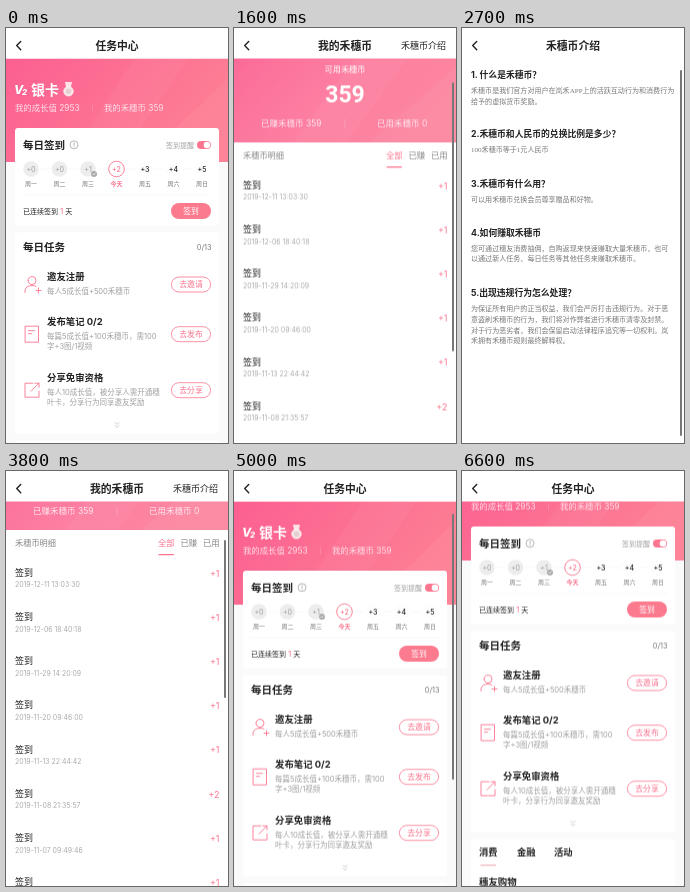
Animation of 222x415 px, one loop 6.8 s. Source, as an HTML page:

```html
<!DOCTYPE html>
<html lang="zh-CN">
<head>
<meta charset="utf-8">
<title>任务中心</title>
<style>
html, body { margin: 0; width: 100%; height: 100%; overflow: hidden; background: #fff; }
svg { display: block; width: 100vw; height: 100vh; }
text { font-family: Inter, "Noto Sans CJK SC", "Noto Sans CJK", sans-serif; white-space: pre; }
.serif { font-family: "Liberation Serif", serif; }
.number { font-family: Roboto, sans-serif; }

.anim { animation: 6.8s cubic-bezier(.22, .7, .2, 1) infinite; }
#home { animation-name: home; }
#coins { animation-name: coins; }
#intro { animation-name: intro; }
#homeTitle { animation-name: home-title; }
#coinsTitle { animation-name: coins-title; }
#introTitle { animation-name: intro-title; }
#homeScroll { animation-name: home-scroll; }
#homeBar { animation-name: home-bar; }
#coinsScroll { animation-name: coins-scroll; }
#coinsBar { animation-name: coins-bar; }
#returnBar { animation-name: return-bar; }

/* page pushes and pops */
@keyframes home {
  0%, 9.56% { transform: translateX(0); }
  19.12%, 58.09% { transform: translateX(-66px); }
  67.65%, 100% { transform: translateX(0); }
}
@keyframes coins {
  0%, 9.56% { transform: translateX(222px); }
  19.12%, 34.56% { transform: translateX(0); }
  39.71%, 47.79% { transform: translateX(-66px); }
  55.88%, 58.09% { transform: translateX(0); }
  67.65%, 100% { transform: translateX(222px); }
}
@keyframes intro {
  0%, 34.56% { transform: translateX(222px); }
  39.71%, 47.79% { transform: translateX(0); }
  55.88%, 100% { transform: translateX(222px); }
}
@keyframes home-title {
  0%, 9.56% { transform: translateX(0); opacity: 1; }
  19.12%, 58.09% { transform: translateX(-80px); opacity: 0; }
  67.65%, 100% { transform: translateX(0); opacity: 1; }
}
@keyframes coins-title {
  0%, 9.56% { transform: translateX(90px); opacity: 0; }
  19.12%, 34.56% { transform: translateX(0); opacity: 1; }
  39.71%, 47.79% { transform: translateX(-80px); opacity: 0; }
  55.88%, 58.09% { transform: translateX(0); opacity: 1; }
  67.65%, 100% { transform: translateX(90px); opacity: 0; }
}
@keyframes intro-title {
  0%, 34.56% { transform: translateX(90px); opacity: 0; }
  39.71%, 47.79% { transform: translateX(0); opacity: 1; }
  55.88%, 100% { transform: translateX(90px); opacity: 0; }
}

/* scrolling and its indicators */
@keyframes home-scroll {
  0%, 73.53% { transform: translateY(0); }
  79.41%, 100% { transform: translateY(-44.5px); }
}
@keyframes home-bar {
  0%, 72.8% { transform: translateY(0); opacity: 0; }
  73.5% { transform: translateY(0); opacity: 1; }
  79.41%, 85% { transform: translateY(31px); opacity: 1; }
  89.7%, 100% { transform: translateY(31px); opacity: 0; }
}
@keyframes coins-scroll {
  0%, 22.79% { transform: translateY(0); }
  23.53% { transform: translateY(-10px); }
  27.94%, 100% { transform: translateY(-66px); }
}
@keyframes coins-bar {
  0%, 22.79% { transform: translateY(0); opacity: 0; }
  23.53% { transform: translateY(7px); opacity: 1; }
  27.94%, 30.9% { transform: translateY(41px); opacity: 1; }
  33.8%, 100% { transform: translateY(41px); opacity: 0; }
}
@keyframes return-bar {
  0%, 50% { opacity: 0; }
  51%, 56.6% { opacity: 1; }
  57.3%, 100% { opacity: 0; }
}
</style>
</head>
<body>
<svg id="stage" viewBox="0 0 222 415" preserveAspectRatio="none">
  <defs>
    <linearGradient id="rose" x2="1" y2=".4">
      <stop stop-color="#fc5f91"/><stop offset="1" stop-color="#fd7f94"/>
    </linearGradient>
    <linearGradient id="blush" x2="1" y2=".4">
      <stop stop-color="#fb6a98"/><stop offset=".55" stop-color="#fd7fa1"/><stop offset="1" stop-color="#fc86a0"/>
    </linearGradient>
  </defs>
</svg>
<script>
const PINK = '#fb758f', INK = '#222', GREY = '#a0a0a0', COIN = '禾穗币';
const BOLD = 'font-weight="700"';

// y is the optical middle of the line
const text = (x, y, size, str, fill = INK, more = '') =>
  `<text x="${x}" y="${y + size * .37}" font-size="${size}" fill="${fill}" ${more}>${str}</text>`;
const bold = (x, y, size, str, fill = INK) => text(x, y, size, str, fill, BOLD);
const mid = (x, y, size, str, fill, more = '') => text(x, y, size, str, fill, 'text-anchor="middle" ' + more);
const end = (x, y, size, str, fill) => text(x, y, size, str, fill, 'text-anchor="end"');
const rect = (x, y, w, h, fill, r = 0, more = '') =>
  `<rect x="${x}" y="${y}" width="${w}" height="${h}" rx="${r}" fill="${fill}" ${more}/>`;
const circle = (x, y, r, fill, more = '') => `<circle cx="${x}" cy="${y}" r="${r}" fill="${fill}" ${more}/>`;
const line = (d, stroke, width = 1) =>
  `<path d="${d}" fill="none" stroke="${stroke}" stroke-width="${width}" stroke-linecap="round" stroke-linejoin="round"/>`;
const moving = (id, ...parts) => `<g id="${id}" class="anim">${parts.join('')}</g>`;
const bar = (y, h) => rect(218, y, 2, h, '#777', 1);
const serif = str => `<tspan class="serif">${str}</tspan>`;

function band(fill, bottom) {
  const facet = (points, opacity) => `<polygon points="${points}" fill="#fff" opacity="${opacity}"/>`;
  return rect(0, 30.5, 222, bottom - 30.5, `url(#${fill})`) +
    facet(`60,${bottom} 128,30.5 182,30.5 112,${bottom}`, .035) +
    facet(`135,${bottom} 222,50 222,${bottom}`, .04);
}

function checkInCard() {
  const days = ['一', '二', '三', '', '五', '六', '日'];
  const gains = [0, 0, 1, 2, 3, 4, 5];
  const week = gains.map((gain, i) => {
    const x = 25 + i * 28.5, past = i < 3, today = i === 3;
    const link = i < 6 ? line(`M${x + 10} 141h8.5`, '#f4f4f4', .7) : '';
    const disc = circle(x, 141, 7.8, past ? '#ededed' : today ? '#fff' : '#fdfdfd',
      today ? `stroke="${PINK}" stroke-width=".9"` : '');
    const label = today ? mid(x, 156, 6, '今天', PINK, BOLD) : mid(x, 156, 6, '周' + days[i], '#777');
    return link + disc + mid(x, 141, 7, '+' + gain, past ? '#aaa' : today ? PINK : INK, 'font-weight="500"') + label;
  }).join('');
  return rect(9, 100, 204, 97.5, '#fff', 3) + bold(17, 117, 10.5, '每日签到') +
    circle(68, 116.8, 4, 'none', 'stroke="#999" stroke-width=".7"') +
    line('M68 114.8v2.4M68 118.8v.1', GREY, .8) +
    text(160, 117, 7, '签到提醒', GREY) +
    rect(191, 113, 14, 8, PINK, 4) + circle(201, 117, 3.3, '#fff') +
    week + circle(88, 146, 3, '#aaa') + line('M86.7 146l1 1 1.7-2', '#fff', .7) +
    line('M17 167H205', '#f5f5f5', .6) +
    text(17, 183, 7, `已连续签到 <tspan fill="${PINK}" font-size="8.2">1</tspan> 天`) +
    rect(165, 175, 40, 16, '#fc7a8e', 8) + mid(185, 183, 7.8, '签到', '#fff');
}

function task(y, icon, title, action, ...notes) {
  const middle = y + 7.5 + (notes.length - 1) * 4.7;
  return `<g transform="translate(26 ${middle})">${line(icon, PINK, .9)}</g>` +
    bold(41, y, 9.4, title) +
    notes.map((note, i) => text(41, y + 14.7 + i * 10, 7.5, note, GREY)).join('') +
    rect(165.4, middle - 7.5, 39.2, 15, '#fff', 7.5, `stroke="${PINK}" stroke-width=".8"`) +
    mid(185, middle, 7.9, action, PINK);
}

function homePage() {
  const person = 'M-4-4a4 4 0 1 0 8 0a4 4 0 1 0-8 0M-7 8V6Q-6 1 0 1Q3 1 4 2M4 6h5M6.5 3.5v5';
  const note = 'M-6.5-8h13v16h-13zM-3.5-3.5h6M-3.5-.5h3';
  const share = 'M1-7H-7V7H7V1M-1 1L7-7M3-7H7V-3';
  return rect(0, 30, 222, 385, '#fafafa') + moving('homeScroll',
    band('rose', 134),
    text(8, 61.5, 12, 'V', '#fff', 'font-weight="800" font-style="italic"'),
    text(16, 64.5, 8, '2', '#fff', 'font-weight="800" font-style="italic"'),
    bold(25, 62, 14, '银卡', '#fff'),
    '<path d="M59 54h7l-1 5h-5z" fill="#fde3e6"/>',
    circle(62.5, 63.3, 4.8, '#f5e4e4', 'stroke="#fff" stroke-width=".6"'),
    circle(62.5, 63.3, 2.6, '#e3cfd2'),
    text(9, 80, 8.4, '我的成长值 2953', '#ffe0e8'),
    line('M86.5 77v6', '#ff9fb5', .5),
    text(98, 80, 8.4, `我的${COIN} 359`, '#ffe0e8'),
    checkInCard(),
    rect(9, 204.5, 204, 201, '#fff', 3),
    bold(17, 219, 10.5, '每日任务'), end(205.5, 219, 7.3, '0/13', '#777'),
    task(249, person, '邀友注册', '去邀请', `每人5成长值+500${COIN}`),
    task(294, note, '发布笔记 0/2', '去发布', `每篇5成长值+100${COIN}，需100`, '字+3图/1视频'),
    task(350, share, '分享免审资格', '去分享', '每人10成长值，被分享人需开通穗', '叶卡，分享行为同享邀友奖励'),
    line('M109 394.5l2 2 2-2M109 397.5l2 2 2-2', '#bbb', .7),
    rect(9, 412.5, 204, 80, '#fff', 3),
    bold(17, 425.5, 9.3, '消费'), bold(55, 425.5, 9.3, '金融'), bold(92, 425.5, 9.3, '活动'),
    rect(18.5, 438.3, 15.5, 1, '#eba3b0'),
    bold(17, 455.5, 9.4, '穗友购物')
  ) + moving('homeBar', bar(42, 266));
}

function coinsPage() {
  const dates = ['12-11 13:03:30', '12-06 18:40:18', '11-29 14:20:09', '11-20 09:46:00',
    '11-13 22:44:42', '11-08 21:35:57', '11-07 09:49:46', ''];
  const rows = dates.map((date, i) => {
    const y = 167.5 + i * 44.2;
    return text(9, y, 9, '签到') + (date && text(9, y + 12.4, 6.9, '2019-' + date, '#aaa')) +
      end(213.5, y + .8, 9, i === 5 ? '+2' : '+1', PINK);
  }).join('');
  return rect(0, 30, 222, 385, '#fff') + moving('coinsScroll',
    band('blush', 125),
    mid(111, 52, 8.2, '可用' + COIN, '#fff'),
    mid(111, 76, 23, '359', '#fff', 'class="number" ' + BOLD),
    text(27, 106, 8.5, `已赚${COIN} 359`, '#ffe6ee'),
    line('M111 102v8', '#ffb5c8', .5),
    text(143, 106, 8.5, `已用${COIN} 0`, '#ffe6ee'),
    text(9, 138, 8.2, COIN + '明细', '#888'),
    text(152, 138, 8.4, '全部', PINK), text(174.5, 138, 8.4, '已赚', '#888'), text(197, 138, 8.4, '已用', '#888'),
    rect(152.5, 149, 15.5, 1.3, PINK, .6),
    rows
  ) + moving('coinsBar', bar(47, 269)) + moving('returnBar', bar(69, 158));
}

function introPage() {
  const sections = [
    [47, `1. 什么是${COIN}？`,
      `${COIN}是我们官方对用户在岚禾${serif('APP')}上的活跃互动行为和消费行为`, '给予的虚拟货币奖励。'],
    [106, `2.${COIN}和人民币的兑换比例是多少？`, `${serif('100')}${COIN}等于${serif('1')}元人民币`],
    [156, `3.${COIN}有什么用？`, `可以用${COIN}兑换会员尊享赠品和好物。`],
    [204.5, `4.如何赚取${COIN}`,
      `您可通过穗友消费抽佣，自购返现来快速赚取大量${COIN}，也可`, `以通过新人任务、每日任务等其他任务来赚取${COIN}。`],
    [265, '5.出现违规行为怎么处理？',
      '为保证所有用户的正当权益，我们会严厉打击违规行为。对于恶',
      `意盗刷${COIN}的行为，我们将对作弊者进行${COIN}清零及封禁。`,
      '对于行为恶劣者，我们会保留启动法律程序追究等一切权利。岚',
      `禾拥有${COIN}规则最终解释权。`]
  ];
  return rect(0, 30, 222, 385, '#fff') + sections.map(([y, heading, ...lines]) =>
    bold(9, y, 8.8, heading) +
    lines.map((str, i) => text(9, y + 15.7 + i * 10.6, 7.05, str, '#777')).join('')
  ).join('') + bar(42, 366);
}

const navTitle = str => mid(111, 17.6, 10.8, str, INK, BOLD);
document.getElementById('stage').innerHTML +=
  moving('home', homePage()) + moving('coins', coinsPage()) + moving('intro', introPage()) +
  rect(0, 0, 222, 30.5, '#fff') +
  moving('homeTitle', navTitle('任务中心')) +
  moving('coinsTitle', navTitle('我的' + COIN), end(212, 18, 9, COIN + '介绍', INK)) +
  moving('introTitle', navTitle(COIN + '介绍')) +
  line('M14.7 13.4l-4 4.2 4 4.2', INK, 1.4);
</script>
</body>
</html>
```
